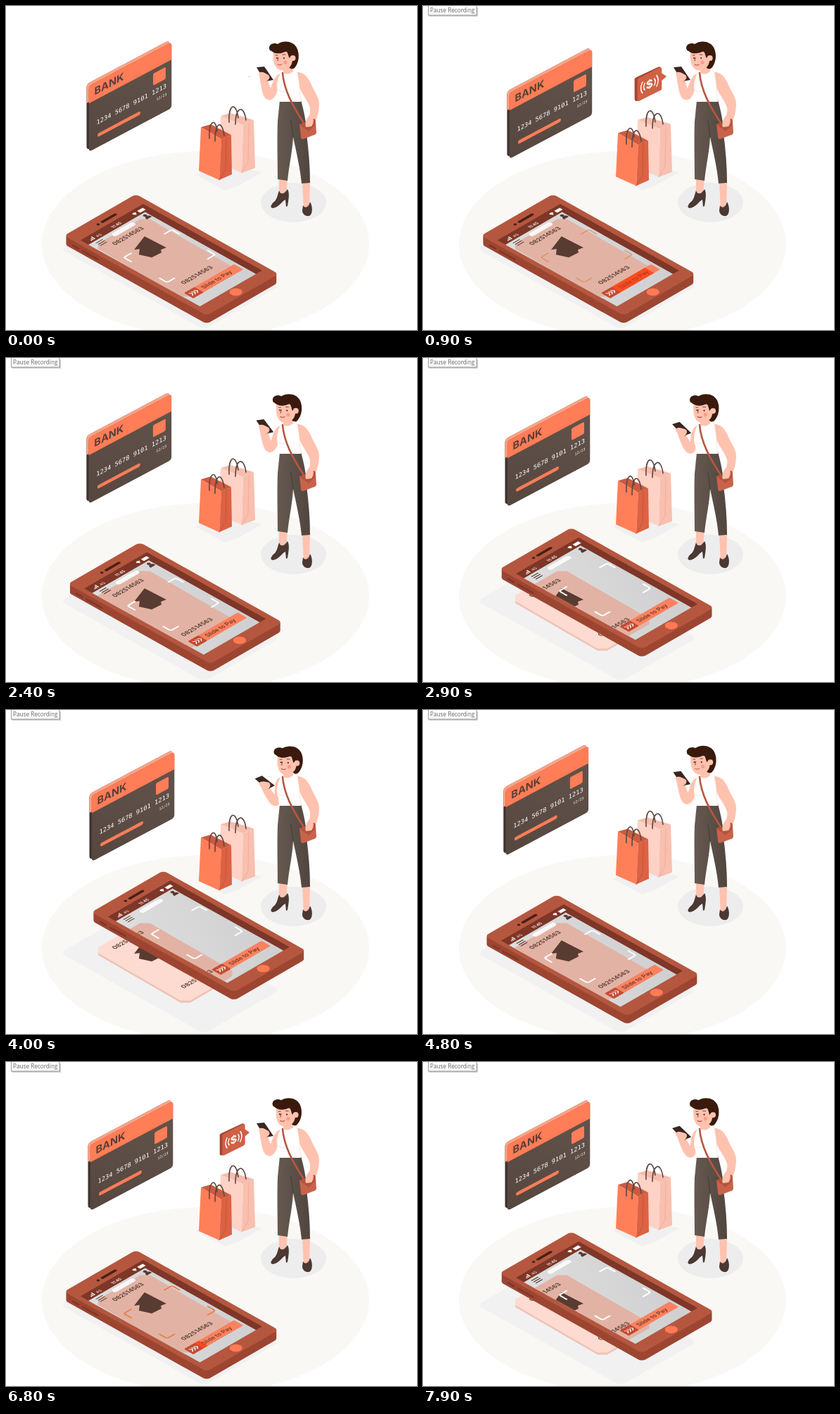
Animation of 584x460 px, one loop 8 s. Source, as an HTML page:

```html
<!DOCTYPE html>
<html lang="en">
<head>
<meta charset="utf-8">
<title>Card payment</title>
<style>
  html, body { margin: 0; width: 100%; height: 100%; overflow: hidden; background: #fff; }
  svg { display: block; width: 584px; height: 460px; }
  text { font-family: Inter, "Open Sans", sans-serif; }
  .mono { font-family: "DejaVu Sans Mono", monospace; fill: #fff; }
  .line { fill: none; stroke-linecap: round; stroke-linejoin: round; }
  .skin { fill: #ffc2af; }
  .dark { fill: #4b3832; }
  .hair { fill: #3a1a0d; }
</style>
</head>
<body>
<svg viewBox="0 0 584 460">
  <defs>
    <linearGradient id="glass" x1="0" y1="0" x2="1" y2="1">
      <stop offset="0" stop-color="#dedede"/><stop offset="1" stop-color="#cfcfd1"/>
    </linearGradient>
    <linearGradient id="trousers"><stop offset="0" stop-color="#655950"/><stop offset="1" stop-color="#51463f"/></linearGradient>
    <linearGradient id="cardFace" x1="0" y1="1" x2="1" y2="0">
      <stop offset="0" stop-color="#55463f"/><stop offset="1" stop-color="#63544c"/>
    </linearGradient>
    <clipPath id="window"><path id="windowShape" d="M11 33H104L107 212H15Z"/></clipPath>
    <clipPath id="cardClip"><rect width="118" height="94" rx="5"/></clipPath>
    <g id="ticket">
      <path fill="currentColor" d="M21 39H90L98 47V182L90 190H21L13 182V47Z"/>
      <path fill="#583b31" d="M69 67L71 101L63.400 99.400L60 104L45 103L38.500 88.500L47 81L41.500 77.500Z"/>
      <g font-size="8.8" font-weight="600" fill="#54382f" text-anchor="middle">
        <text x="56" y="56">082514563</text><text x="57" y="168">082514563</text>
      </g>
    </g>
  </defs>

  <!-- floor and shadows -->
  <ellipse cx="283.5" cy="338" rx="232.5" ry="132" fill="#f9f8f4"/>
  <ellipse cx="408.500" cy="279" rx="46.500" ry="28" fill="#ededee"/>
  <path d="M270 240L300 222L364 236L332 254L312 262Z" fill="#f0f0f1"/>
  <g transform="matrix(.866 -.5 .866 .485 77 345)"><rect width="124" height="236" rx="8" fill="#f1f1f2"/></g>

  <!-- bank card -->
  <g id="card">
    <g transform="matrix(1 -.53 0 1 114.5 111)">
      <rect width="118" height="94" rx="5" fill="#3f332e"/>
      <path d="M0 27V5Q0 0 5 0H113Q118 0 118 5V27Z" fill="#ffa286"/>
    </g>
    <g transform="matrix(1 -.53 0 1 117.500 113.500)">
      <g clip-path="url(#cardClip)">
        <path d="M0 0H118V94H0Z" fill="url(#cardFace)"/>
        <path d="M0 0H118V25H0Z" fill="#ff7d57"/>
      </g>
      <text x="8" y="17.5" font-size="14.500" font-weight="700" fill="#5a4038">BANK</text>
      <rect x="91.500" y="31" width="18" height="17" rx="2" fill="#ff7d57"/>
      <text class="mono" x="11" y="61" font-size="8.700">1234 5678 9101 1213</text>
      <text class="mono" x="96" y="72" font-size="5">12/23</text>
      <path class="line" d="M15 77H71" stroke="#ff7d57" stroke-width="5"/>
    </g>
  </g>

  <!-- shopping bags -->
  <g id="backBag">
    <path d="M305 156L319 152L352 162L337 169Z" fill="#f6bcad"/>
    <path d="M305 156L337 169L335 237L303 223Z" fill="#ffd2c6"/>
    <path d="M337 169L352 162L354 230L335 237Z" fill="#f9bfaf"/>
    <path d="M345 166L344 222L335 237" class="line" stroke="#f0ae9c"/>
    <path d="M317 165C316 138 327 136 330 159M326 168C326 143 338 139 341 162" class="line" stroke="#5c4740" stroke-width="1.6"/>
  </g>
  <g id="frontBag">
    <path d="M277 172L291 168L320 183L306 189Z" fill="#cc5b40"/>
    <path d="M277 172L306 189L303 247L274 234Z" fill="#ff7f59"/>
    <path d="M306 189L320 183L321 239L303 247Z" fill="#dc6244"/>
    <path d="M313 186L312 232L303 247" class="line" stroke="#c75439"/>
    <path d="M289 188C288 162 298 158 300 178M297 192C297 164 307 161 310 184" class="line" stroke="#5c4740" stroke-width="1.6"/>
  </g>

  <!-- shopper -->
  <g id="arm">
    <path class="skin" d="M390 96L386 120C383 129 378 135 372 133C366 131 364 124 361 105L370 101C373 107 374 113 376 117C379 108 382 98 390 96Z"/>
    <path d="M356 87L367 86L380 105L368 107Z" fill="#3a2621"/>
    <path class="skin" d="M359 95C363 92 368 95 373 98C376 101 374 105 369 107L362 108Z"/>
  </g>
  <path class="skin" d="M388 244H400L398 268L388 276ZM421 249H432L431 284L423 290Z"/>
  <path class="dark" d="M388 262C390 268 395 268 400 260C403 265 402 273 400 284L398 285L397 275C392 277 388 286 379 287C374 286 377 281 382 277C386 272 386 267 388 262ZM422 283C425 288 430 286 432 278C436 284 436 296 431 298C425 299 421 295 421 290Z"/>
  <path d="M389 134L419 133C423 149 427 164 427 181C430 205 432 227 432 251L420 252C418 230 412 205 408 186C407 207 402 227 400 248L386 246C386 220 385 190 386 164Z" fill="url(#trousers)"/>
  <path d="M408 186L405 162" class="line" stroke="#463b35"/>
  <path d="M390 95L410 92Q418 94 419 100L420 121L419 136H388L387 125C383 115 386 103 390 95Z" fill="#fff"/>
  <path d="M386 118C390 124 398 122 401 117M419 100L417 116L419 135" class="line" stroke="#eee7e4"/>
  <path class="skin" d="M414 94C424 94 430 102 434 112C438 122 446 130 445 142C444 153 441 166 434 172L425 168C431 158 433 151 432 144C428 132 420 126 417 114Z"/>
  <path d="M393 95C395 119 407 142 425 169" class="line" stroke="#b5573f" stroke-width="2.6"/>
  <path d="M417 168L437 160Q440 160 440 163L441 179Q441 182 438 183L422 189Q419 189 419 186Z" fill="#c7634a"/>
  <path d="M417 168L438 160L439 169L430 178Z" fill="#b5533b"/>
  <path class="skin" d="M432 154C437 157 439 164 434 171L426 172C424 167 427 159 432 154Z"/>
  <path class="skin" d="M394 84H407L408 93Q401 99 394 95Z"/>
  <g id="head">
    <path class="hair" d="M375 63C371 55 380 51 386 54C395 48 408 50 413 59C418 69 416 81 410 88C405 92 398 87 397 70Z"/>
    <path class="skin" d="M380 64C378 78 382 91 392 91.500C402 91 407 84 407 76L402 65Z"/>
    <path class="hair" d="M374 60C376 54 386 53 390 55C399 50 409 56 408 68L403 74C401 72 401 66 398 64C390 69 379 69 374 60Z"/>
    <circle class="skin" cx="407.500" cy="74" r="4"/>
    <path d="M383 70h3M393 69h4M387 73l-1 5" class="line" stroke="#86473a"/>
    <circle cx="385" cy="74" r="1.100" fill="#3c2319"/><circle cx="395" cy="74" r="1.100" fill="#3c2319"/>
    <circle cx="397" cy="80" r="2.600" fill="#ff9a88"/>
    <path d="M386 83q3 2 6 0" class="line" stroke="#b8503f"/>
  </g>

  <!-- payment bubble -->
  <g id="bubble">
    <path d="M299 106Q298 103 302 101L334 86Q338 85 338 89L337 119L303 136Q299 137 299 133Z" fill="#a5452f"/>
    <path d="M303 106Q303 103 306 102L335 87Q339 86 339 90V95L346 100L339 106V117Q339 120 336 121L306 136Q303 137 303 134Z" fill="#cf6146"/>
    <g transform="matrix(1 -.47 0 1 321 111.500)">
      <text y="5.500" font-size="16" font-weight="700" fill="#fff" text-anchor="middle">$</text>
      <path d="M-7 -5Q-10 0 -7 5M-10.500 -8Q-15 0 -10.500 8M7 -5Q10 0 7 5M10.500 -8Q15 0 10.500 8" class="line" stroke="#fff" stroke-width="1.600"/>
    </g>
  </g>

  <!-- paper ticket on the floor -->
  <g transform="matrix(.866 -.5 .866 .5 79 331)"><path d="M21 39H90L98 47V182L90 190H21L13 182V47Z" fill="#efc3b6"/></g>
  <g transform="matrix(.866 -.5 .866 .5 79 328)"><use href="#ticket" color="#fddbd1"/></g>

  <!-- big phone -->
  <g id="phoneBody">
    <g id="sides"></g>
    <path d="M95 340l8 4.500M109 348l21 11.500" class="line" stroke="#843827" stroke-width="3"/>
    <g transform="matrix(.866 -.5 .866 .485 82.500 326)"><rect width="118" height="234" rx="6" fill="#b5573f"/></g>
    <g transform="matrix(.866 -.5 .866 .5 79 328)">
      <path d="M11 20H114L117 212H15Z" fill="#7d3627"/>
      <path d="M11 33H104L107 212H15Z" fill="url(#glass)"/>
      <path class="line" d="M55 12H76" stroke="#4a1f17" stroke-width="4"/>
      <circle cx="48" cy="12" r="2" fill="#4a1f17"/>
      <circle cx="65" cy="221" r="7.500" fill="#ff7a55"/>
    </g>
  </g>
  <g transform="matrix(.866 -.5 .866 .5 79 328)" clip-path="url(#window)"><use href="#ticket" color="#e2b3a5"/></g>
  <g id="phoneUi">
    <g transform="matrix(.866 -.5 .866 .5 79 328)">
      <g fill="#fff">
        <path d="M19 30v-2h1.500v2zM21.500 30v-4H23v4zM24 30v-6h1.500v6zM99 25h9v5h-9z"/>
        <text x="29" y="30" font-size="5.500">4G</text>
        <text x="62" y="30" font-size="6" font-weight="600" text-anchor="middle">11:45</text>
        <path d="M90 26q3-3 6 0l-3 4z"/>
        <rect x="44" y="36.500" width="36" height="7" rx="3.500" opacity=".85"/>
      </g>
      <path class="line" d="M20 37h10M20 40.500h10M20 44h10" stroke="#5a4038" stroke-width="1.300"/>
      <circle cx="99" cy="38" r="2.300" fill="#54382f"/><path d="M95 45q0-5 4-5t4 5z" fill="#54382f"/>
      <path id="brackets" class="line" stroke-width="2.200" d="M22 92V83Q22 80 25 80H34M89 80H98Q101 80 101 83V92M101 139V148Q101 151 98 151H89M34 151H25Q22 151 22 148V139"/>
      <rect x="21" y="180" width="82" height="15" rx="1.500" fill="#f8825f"/>
      <rect id="fill" x="37" y="180" height="15" fill="#fb4c20"/>
      <rect x="21" y="180" width="17" height="15" rx="1.500" fill="#c24c34"/>
      <path class="line" d="M24.500 184.500l3 3-3 3M28.500 184.500l3 3-3 3M32.500 184.500l3 3-3 3" stroke="#fff" stroke-width="1.200"/>
      <text id="slideText" x="43" y="190.500" font-size="8.500" font-weight="500" fill="#6f2d1f">Slide to Pay</text>
    </g>
  </g>

  <!-- tooltip -->
  <g id="tip">
    <path d="M8 14H77V2" fill="none" stroke="#bdbdbd" stroke-width="1.500"/>
    <path d="M7.500 -1H76V13H7.500Z" fill="#fff" stroke="#858585" stroke-width=".8"/>
    <text x="10" y="9.200" font-size="8.200" fill="#636363" style="font-family:'Open Sans',sans-serif">Pause Recording</text>
  </g>
</svg>
<script>
  const LOOP = 8000, CYCLE = 5000, BOB = 2500, TAU = Math.PI * 2;
  const $ = id => document.getElementById(id);
  const set = (id, name, value) => $(id).setAttribute(name, value);
  const move = (id, x, y) => set(id, 'transform', `translate(${x} ${y})`);
  const smooth = x => { x = Math.min(1, Math.max(0, x)); return x * x * (3 - 2 * x); };

  // Eased value through [time, value] stops
  function track(stops, t) {
    for (let i = 1; i < stops.length; i++) {
      const [a, from] = stops[i - 1], [b, to] = stops[i];
      if (t <= b) return from + (to - from) * smooth((t - a) / (b - a));
    }
    return stops[stops.length - 1][1];
  }

  const lift = [[0, 0], [2100, 0], [3400, 1], [3980, 1], [5040, 0]];
  const nod = [[0, 0], [800, 0], [1700, .7], [2700, .75], [3800, 1], [4100, 1], [5000, 0]];
  const pop = [[0, .02], [500, 1.04], [700, 1], [1200, .9], [1900, .9], [2350, 0]];
  const slide = [[0, 0], [150, 0], [700, 56], [1100, 56], [1800, 8], [2100, 0]];

  // Extruded phone edge
  let edge = '';
  for (let depth = 12; depth > 0; depth--) {
    edge += `<g transform="matrix(.866 -.5 .866 .485 82.5 ${326 + depth})">
      <rect width="118" height="234" rx="6" fill="#9c4632"/></g>`;
  }
  $('sides').innerHTML = edge;

  function draw(time) {
    const p = time % CYCLE;
    const up = track(lift, p), dx = 39 * up;
    move('phoneBody', dx, -dx);
    move('phoneUi', dx, -dx);
    // Screen-space (dx, -dx) expressed in floor axes
    const a = dx / .866, b = dx / .5;
    move('windowShape', (a + b) / 2, (a - b) / 2);

    const cardY = 5.5 * (1 + Math.cos(TAU * (p - 1100) / BOB)) - .4;
    move('card', cardY * .5, cardY);
    const bagY = (1 - Math.cos(TAU * p / BOB)) / 2;
    move('frontBag', 0, 10 * bagY);
    move('backBag', 0, 7 * bagY);

    const n = track(nod, p);
    set('head', 'transform', `translate(${5 * n} ${n}) rotate(${3 * n} 399 90)`);
    set('arm', 'transform', `rotate(${-18 * up} 388 100)`);
    set('bubble', 'transform', `translate(346 100) scale(${track(pop, p)}) translate(-346 -100)`);

    const scanning = p > 150 && p < 2150;
    set('brackets', 'stroke', scanning ? '#e5804f' : '#fff');
    set('brackets', 'opacity', scanning ? .5 + .5 * Math.cos(TAU * (p - 1800) / 733) : 1);

    const width = track(slide, p);
    set('fill', 'width', width);
    set('slideText', 'opacity', 1 - .4 * width / 56);
    set('tip', 'opacity', smooth((time - 100) / 200));
  }

  const start = performance.now();
  function tick() {
    draw((performance.now() - start) % LOOP);
    requestAnimationFrame(tick);
  }
  tick();
</script>
</body>
</html>
```
